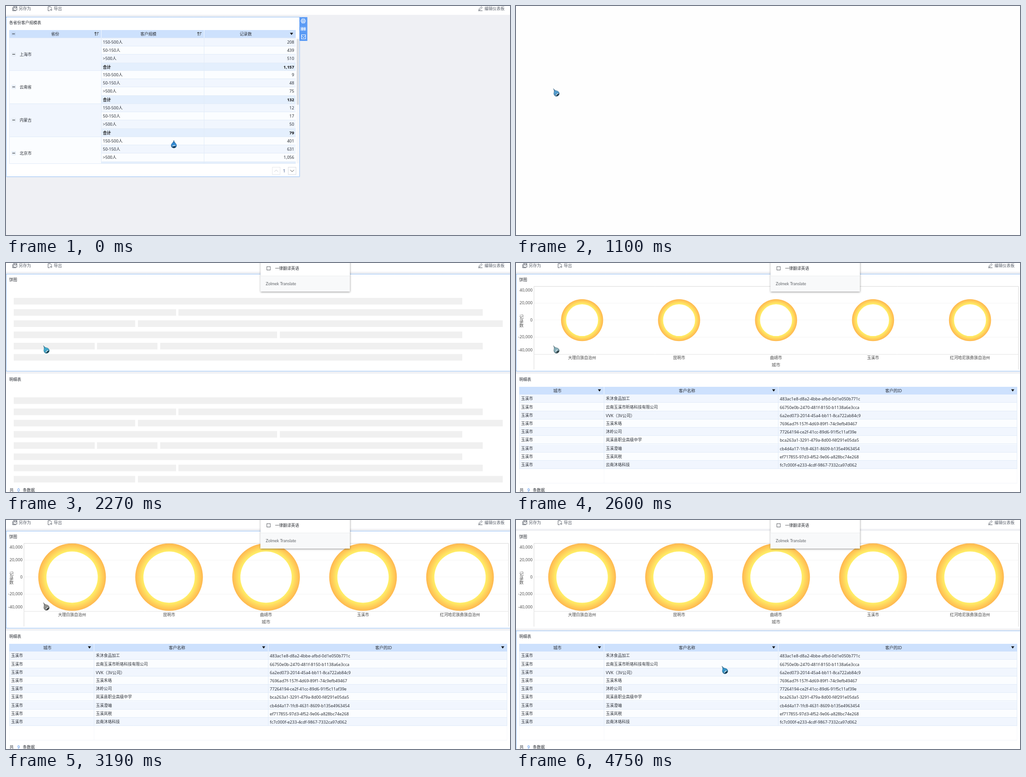
An HTML page with a canvas for the animation above (4.85 s loop, 1108 by 505 pixels).

```html
<!DOCTYPE html>
<html lang="zh-CN">
<head>
<meta charset="utf-8">
<title>仪表板</title>
<style>
html, body { margin: 0; width: 100%; height: 100%; overflow: hidden; background: #fff; }
canvas { display: block; }
</style>
</head>
<body>
<canvas width="1108" height="505"></canvas>
<script>
const ctx = document.querySelector('canvas').getContext('2d');
const W = 1108, H = 505, LOOP = 4850;
const BLUE = '#3b82e6', INK = '#2b2f36', HEAD = '#cde1fd', TINT = '#f1f6fe', PALE = '#fbfdff', LINE = '#e1ebf8';
const ROW = 18.2;

const GROUPS = [
  ['上海市', '208', '439', '510', '1,157'],
  ['云南省', '9', '48', '75', '132'],
  ['内蒙古', '12', '17', '50', '79'],
  ['北京市', '401', '631', '1,056', '2,088']
];
const SIZES = ['150-500人', '50-150人', '>500人', '合计'];
const CITIES = ['大理白族自治州', '昆明市', '曲靖市', '玉溪市', '红河哈尼族彝族自治州'];
const CUSTOMERS = [
  ['禾沐食品加工', '483ac1e8-d8a2-4bbe-afbd-0d1e050b771c'],
  ['云南玉溪市昕珞科技有限公司', '66750e0b-2470-481f-8150-b1138a6e3cca'],
  ['VVK（3V公司）', '6a2ed073-2014-45a4-bb11-8ca722ab84c9'],
  ['玉溪禾珞', '7696ad7f-157f-4d69-89f1-74c9efb49467'],
  ['沐岭公司', '77264194-ce2f-41cc-89d6-91f5c11af39e'],
  ['岚溪县职业高级中学', 'bca263a1-3291-479a-8d00-f4f291e05da5'],
  ['玉溪澄岫', 'cb4d4a17-1fc8-4631-8609-b135e4963454'],
  ['玉溪岚税', 'ef717855-97d3-4f52-9e06-a828bc74e268'],
  ['云南沐珞科技', 'fc7c000f-e233-4cdf-9867-7332ca97d062']
];
const SKELETON = [
  [[17, 1003]],
  [[17, 374], [379, 1048]],
  [[17, 284], [290, 1092]],
  [[17, 596], [602, 1003]],
  [[17, 195], [200, 333], [339, 1048]]
];

// Drawing helpers
function rect(x, y, w, h, fill) {
  ctx.fillStyle = fill;
  ctx.fillRect(x, y, w, h);
}
function line(points, color, width = 1) {
  ctx.beginPath();
  points.forEach(([x, y]) => ctx.lineTo(x, y));
  ctx.strokeStyle = color;
  ctx.lineWidth = width;
  ctx.stroke();
}
function frame(x, y, w, h, color) {
  ctx.strokeStyle = color;
  ctx.lineWidth = 1;
  ctx.strokeRect(x, y, w, h);
}
// y is the visual centre of the text; the baseline snaps to whole pixels
function text(s, x, y, { align = 'left', color = INK, size, weight = 400, family = '"Noto Sans", "Noto Sans CJK SC"' } = {}) {
  size ??= /^[ -~]/.test(s) ? 9.1 : 8.8;
  ctx.font = `${weight} ${size}px ${family}, sans-serif`;
  ctx.textAlign = align;
  ctx.fillStyle = color;
  ctx.fillText(s, x, Math.round(y + size * 0.36));
  return ctx.measureText(s).width;
}
function dashed(x, y, w, h) {
  ctx.setLineDash([2, 1]);
  frame(x, y, w, h, '#5b9ff0');
  ctx.setLineDash([]);
}
function triangle(x, y) {
  ctx.beginPath();
  ctx.moveTo(x - 3.5, y - 2.5);
  ctx.lineTo(x + 3.5, y - 2.5);
  ctx.lineTo(x, y + 2.5);
  ctx.fillStyle = '#111';
  ctx.fill();
}
function minusBox(x, y, fill) {
  rect(x - 4.5, y - 4.5, 9, 9, fill);
  line([[x - 3, y], [x + 3, y]], '#222');
}
function sortIcon(x, y) {
  line([[x - 3, y + 4], [x - 3, y - 3.5]], '#222');
  line([[x - 5, y - 1.5], [x - 3, y - 4], [x - 1, y - 1.5]], '#222');
  [4.5, 3, 1.5].forEach((w, i) => line([[x, y - 3 + i * 3], [x + w, y - 3 + i * 3]], '#222'));
}
function chevron(x, y, dir, color) {
  line([[x - 4, y - 2 * dir], [x, y + 2 * dir], [x + 4, y - 2 * dir]], color);
}

function toolbar() {
  rect(0, 0, W, H, '#eff0f4');
  rect(0, 0, W, 19.5, '#fff');
  const c = '#5a606b';
  frame(16.5, 1.5, 7.5, 7.5, c);
  line([[14.5, 3], [14.5, 10.5], [22, 10.5]], c);
  line([[18.5, 1.5], [18.5, 4.5], [22.5, 4.5], [22.5, 1.5]], c);
  text('另存为', 28, 6, { color: c, size: 9 });
  line([[96, 10.5], [92.5, 10.5], [92.5, 1.5], [97.5, 1.5], [100, 4], [100, 6]], c);
  line([[96, 8.5], [101, 8.5]], c);
  line([[99, 6.5], [101, 8.5], [99, 10.5]], c);
  text('导出', 105, 6, { color: c, size: 9 });
  line([[1039.5, 9], [1040, 6.5], [1045, 1.5], [1047, 3.5], [1042, 8.5], [1039.5, 9]], c);
  line([[1038, 10.5], [1047.5, 10.5]], c);
  text('编辑仪表板', 1052, 6, { color: c });
}

function sideTools() {
  rect(645, 24.5, 17.5, 52.5, '#5b9bf5');
  const hexagon = Array.from({ length: 7 }, (_, i) =>
    [653.5 + 5 * Math.cos(i * Math.PI / 3), 33 + 5 * Math.sin(i * Math.PI / 3)]);
  line(hexagon, '#fff', 1.2);
  ctx.beginPath();
  ctx.arc(653.5, 33, 2, 0, 7);
  ctx.stroke();
  [648.5, 651.5, 655.5, 658.5].forEach((x, i) => line([[x, 46.5], [x, 54.5]], '#fff', i % 3 ? 2 : 1));
  line([[649, 50.5], [658, 50.5]], '#fff');
  frame(649.5, 63.5, 9, 9, '#fff');
  chevron(654, 68, 1, '#fff');
}

function summaryPage(highlight) {
  toolbar();
  rect(0, 24, 645.5, 353, '#fff');
  text('各省份客户规模表', 7, 37);

  ctx.save();
  ctx.beginPath();
  ctx.rect(7, 70, 631, 277.5);
  ctx.clip();
  GROUPS.forEach(([province, ...counts], g) => {
    const top = Math.round(70.6 + g * 4 * ROW);
    rect(7, top, 202, 4 * ROW, g % 2 ? PALE : TINT);
    minusBox(17, top + 35.5, '#e6edf6');
    text(province, 30, top + 36.2);
    counts.forEach((count, k) => {
      const y = Math.round(top + k * ROW), total = k === 3;
      rect(209, y, 428, ROW + 1, total ? '#e4effd' : (g * 3 + k) % 2 ? PALE : TINT);
      line([[209, y - 0.5], [637, y - 0.5]], LINE);
      const style = { weight: total ? 700 : 400, color: total ? '#111' : INK };
      text(SIZES[k], 213, y + 9.2, style);
      text(count, 633.5, y + 9.2, { ...style, align: 'right' });
    });
    line([[7, top - 0.5], [637, top - 0.5]], LINE);
  });
  [7.5, 209.5, 435.5].forEach(x => line([[x, 70], [x, 347]], LINE));
  ctx.restore();
  line([[7, 347.5], [637, 347.5]], LINE);

  rect(7, 53, 630, 17, HEAD);
  [209.5, 435.5].forEach(x => line([[x, 53], [x, 70]], '#f4f8ff'));
  text('省份', 108, 62, { align: 'center' });
  text('客户规模', 313, 62, { align: 'center' });
  text('记录数', 527, 62, { align: 'center' });
  minusBox(16.5, 61.5, '#c1d6f3');
  sortIcon(199.5, 61.5);
  sortIcon(425.5, 61.5);
  triangle(627.7, 61.5);

  rect(638.5, 70, 6, 277, '#f7f8fa');
  rect(639, 73, 5, 144.5, '#dcdee2');
  frame(585.5, 355.5, 17, 16, '#e6e8ec');
  frame(620.5, 355.5, 17, 16, '#d9dce2');
  chevron(594, 363.5, -1, '#c4c8ce');
  chevron(629, 363.5, 1, '#444');
  text('1', 611.5, 363.5, { align: 'center', color: '#2b4a80' });
  if (highlight) dashed(0.5, 24.5, 645, 352);
  sideTools();
}

function loader(t) {
  for (let i = 0; i < 3; i++) {
    const h = 23.5 - 12.5 * Math.cos((t - 1170) / 1000 * 2 * Math.PI - i * Math.PI / 2);
    ctx.beginPath();
    ctx.roundRect(541 + i * 11.7, 233 - h / 2, 3.7, h, 1.5);
    ctx.fillStyle = BLUE;
    ctx.fill();
  }
}

function skeleton(top, rows) {
  for (let i = 0; i < rows; i++)
    for (const [a, b] of SKELETON[i % 5]) rect(a, top + i * 24.75, b - a, 14.5, '#f0f0f0');
}

function ring(x, scale) {
  const outer = 74.5 * scale, inner = 56.5 * scale, y = 126;
  if (outer <= 0) return;
  const glow = ctx.createRadialGradient(x, y, inner, x, y, outer);
  glow.addColorStop(0, '#fff068');
  glow.addColorStop(1, '#ffb74f');
  ctx.beginPath();
  ctx.arc(x, y, outer, 0, 2 * Math.PI);
  ctx.arc(x, y, inner, 0, 2 * Math.PI, true);
  ctx.fillStyle = glow;
  ctx.fill();
}

function chart(t) {
  const hovered = t >= 3520 && t < 3810;
  const soft = '#555';
  [88.5, 125.5, 163.5].forEach(y => line([[39, y], [1104, y]], '#f5f5f5'));
  line([[39.5, 235], [39.5, 51.5], [1104.5, 51.5], [1104.5, 235]], '#d9d9d9');
  line([[39, 201.5], [1104, 201.5]], '#e4e4e4');
  if (hovered) rect(40, 202, 212, 14.5, '#f3f3f3');
  [59.5, 88, 125.5, 163, 192].forEach((y, i) =>
    text(((2 - i) * 20000).toLocaleString('en-US'), 36.5, y, { align: 'right', color: soft, size: 9.2 }));
  [...'记录数'].forEach((c, i) => text(c, 12, 119 + i * 9.3, { align: 'center', color: soft, size: 9.5 }));
  const scale = 1 - (1 - Math.min(1, Math.max(0, (t - 2330) / 980))) ** 3;
  CITIES.forEach((city, i) => {
    const x = 145.3 + i * 213.2;
    ring(x, scale);
    text(city, x, 208.5, { align: 'center', color: '#444' });
  });
  text('城市', 571.5, 225, { align: 'center', color: soft, size: 9.6 });
}

function detailTable() {
  CUSTOMERS.forEach((row, i) => {
    const y = Math.round(290.4 + i * ROW);
    rect(7, y, 1095, ROW, i % 2 ? PALE : TINT);
    line([[7, y + 17.5], [1102, y + 17.5]], LINE);
    ['玉溪市', ...row].forEach((s, c) => text(s, [11, 197.5, 580][c], y + 9.3));
  });
  [7.5, 193.5, 576.5, 1101.5].forEach(x => line([[x, 290], [x, 454]], LINE));
  [7.5, 193.5, 1101.5].forEach(x => line([[x, 454], [x, 486]], '#f6f8fb'));
  line([[7, 485.5], [1102, 485.5]], '#f2f5f9');
  rect(7, 273, 1095, 17, HEAD);
  [193.5, 576.5].forEach(x => line([[x, 273], [x, 290]], '#f4f8ff'));
  [['城市', 91, 183.5], ['客户名称', 376, 566.5], ['客户的ID', 830, 1092]].forEach(([s, x, arrow]) => {
    text(s, x, 281.7, { align: 'center', size: 9 });
    triangle(arrow, 281);
  });
}

function translatePopup() {
  ctx.save();
  ctx.shadowColor = 'rgba(0,0,0,.45)';
  ctx.shadowBlur = 4;
  ctx.shadowOffsetY = 1;
  rect(559.5, -10, 196.5, 73, '#fff');
  ctx.restore();
  rect(559.5, 28.5, 196.5, 34.5, '#f8f9fa');
  line([[559.5, 28.5], [756, 28.5]], '#eceef0');
  frame(573.5, 8, 7.5, 7.5, '#5f6368');
  text('一律翻译英语', 591.5, 12, { color: '#303338' });
  text('Zolmek Translate', 571, 46, { color: '#5f6368', size: 9, family: 'Lato' });
}

function tooltip() {
  ctx.beginPath();
  ctx.roundRect(145, 200.5, 106, 35.5, 2);
  ctx.fillStyle = 'rgba(50,50,50,.85)';
  ctx.fill();
  [['城市:', '大理白族自治州'], ['记录数:', '10']].forEach(([label, value], i) => {
    const y = 210 + i * 16, style = { color: '#fff', size: 10.4 };
    const w = text(label, 149.5, y, style);
    text(value, 149.5 + w, y, { ...style, weight: 600 });
  });
}

function detailPage(t) {
  toolbar();
  if (t >= 1870) {
    const loaded = t >= 2350, onTable = t >= 3810;
    rect(0, 24, W, 215.5, '#fff');
    rect(0, 244, W, 261, '#fff');
    text('饼图', 7, 37);
    text('明细表', 7, 256.5);
    if (loaded) {
      chart(t);
      detailTable();
    } else {
      skeleton(77, 6);
      skeleton(296.3, 8);
    }
    text('共', 8, 501);
    text(loaded ? '9' : '0', 27.5, 501, { align: 'center', color: BLUE });
    text('条数据', 37, 501);
    if (onTable) dashed(0.5, 244.5, W + 4, 270);
    else dashed(0.5, 24.5, W + 4, 214);
  }
  if (t >= 2030) translatePopup();
  if (t >= 3520 && t < 3880) tooltip();
}

// Interpolates rows of [time, ...values]
function track(keys, t, ease = p => p) {
  const i = keys.findIndex(k => k[0] > t);
  if (i < 0) return keys.at(-1).slice(1);
  const a = keys[i - 1], b = keys[i], p = ease((t - a[0]) / (b[0] - a[0]));
  return a.slice(1).map((v, j) => v + (b[j + 1] - v) * p);
}
const smooth = p => p * p * (3 - 2 * p);
const PATH = [[0, 369, 307], [40, 369, 307], [560, 89, 202], [630, 89, 193], [3310, 89, 193],
  [3700, 240, 231], [3790, 240, 234], [3920, 270, 295], [4090, 400, 362], [4330, 459.5, 333]];
const TINTS = [[0, 46, 130, 200], [1020, 75, 150, 195], [1170, 80, 145, 195], [2270, 60, 160, 195],
  [2810, 165, 165, 160], [3730, 95, 95, 95], [4100, 60, 135, 180], [4750, 50, 140, 190]];

function cursor(t) {
  const [x, y] = track(PATH, t, smooth);
  const [r, g, b] = track(TINTS, t);
  const shade = k => `rgb(${r * k},${g * k},${b * k})`;
  const upright = t < 600 || (t >= 3560 && t < 3860);
  ctx.save();
  ctx.translate(x, y);
  if (!upright) ctx.rotate(-0.56);
  const tip = upright ? -11 : -13;
  const shoulder = upright ? -4 : -6;
  const neck = upright ? -5.5 : -3.5;
  ctx.beginPath();
  ctx.moveTo(0, tip);
  ctx.bezierCurveTo(0.8, neck, 6, shoulder, 6, 0.5);
  ctx.bezierCurveTo(6, 8, -6, 8, -6, 0.5);
  ctx.bezierCurveTo(-6, shoulder, -0.8, neck, 0, tip);
  const fill = ctx.createLinearGradient(0, tip, 0, 6.5);
  fill.addColorStop(0, shade(0.75));
  fill.addColorStop(0.5, shade(1.1));
  fill.addColorStop(0.8, shade(0.85));
  fill.addColorStop(1, shade(0.4));
  ctx.fillStyle = fill;
  ctx.fill();
  ctx.strokeStyle = shade(0.6);
  ctx.lineWidth = 0.5;
  ctx.stroke();
  ctx.beginPath();
  ctx.ellipse(0, 1 + Math.sin(t / 150), 3.8, 1.2, -0.2, 0, 7);
  ctx.fillStyle = 'rgba(235,248,255,.7)';
  ctx.fill();
  ctx.beginPath();
  ctx.ellipse(0.8, 3.8, 3, 1.2, 0, 0, 7);
  ctx.fillStyle = shade(0.3);
  ctx.fill();
  ctx.restore();
}

function draw() {
  const t = performance.now() % LOOP;
  rect(0, 0, W, H, '#fefefe');
  if (t < 1100) summaryPage(t < 950);
  else if (t >= 1600) detailPage(t);
  else if (t >= 1140) loader(t);
  cursor(t);
  requestAnimationFrame(draw);
}
draw();
</script>
</body>
</html>
```
